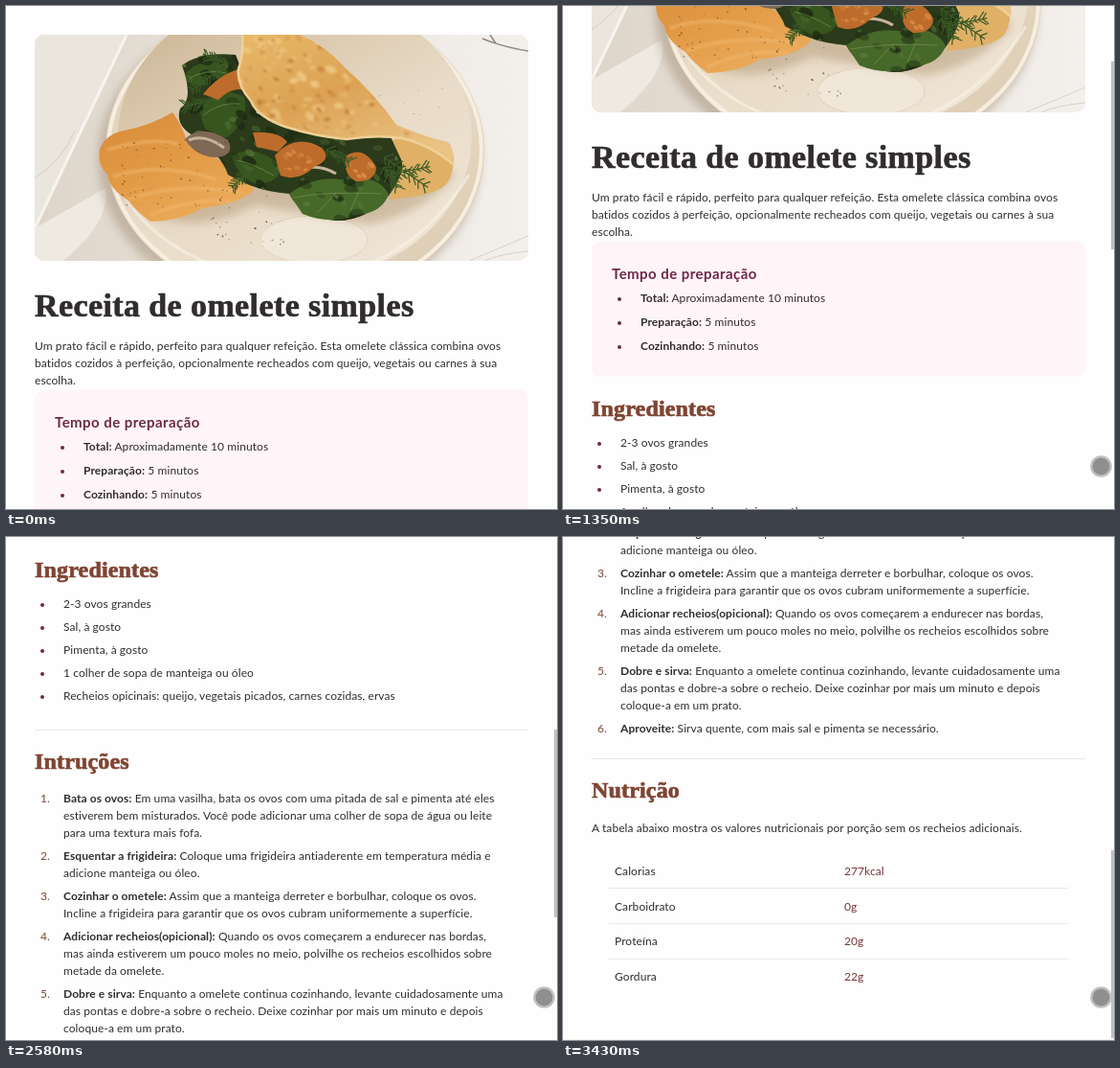
An HTML page that plays this animation: 576 by 525 pixels, repeating every 3.63 s.

```html
<!DOCTYPE html>
<html lang="pt-BR">
<head>
<meta charset="utf-8">
<title>Receita de omelete simples</title>
<style>
html, body { margin: 0; width: 100%; height: 100%; overflow: hidden; background: #fefefe; }
svg { display: block; }
text { font: 400 12px Lato, sans-serif; letter-spacing: .08px; fill: #312d2c; white-space: pre; }
.b { font-weight: 700; }
text.h1, text.h2 { font-family: "Liberation Serif", serif; font-weight: 700; stroke-width: .7px; }
text.h1 { font-size: 34px; letter-spacing: .4px; fill: #302d2c; stroke: #302d2c; }
text.h2 { font-size: 24px; letter-spacing: .17px; fill: #7f4533; stroke: #7f4533; }
text.h3 { font-size: 15px; font-weight: 700; letter-spacing: .45px; fill: #6c2944; }
text.num { fill: #7f4533; text-anchor: end; }
text.val { fill: #75333a; }
.dots circle { fill: #6c2944; }
.rules { stroke: #ebe9e8; }
</style>
</head>
<body>
<svg width="576" height="525" viewBox="0 0 576 525">
<defs>
  <clipPath id="frame"><rect x="30" y="30" width="516" height="236" rx="10"/></clipPath>
  <linearGradient id="marble"><stop offset="0" stop-color="#ddd5ca"/><stop offset=".3" stop-color="#e6dfd5"/><stop offset="1" stop-color="#f3f0ec"/></linearGradient>
  <linearGradient id="rim" x2="1" y2="1"><stop offset="0" stop-color="#dccbb2"/><stop offset=".5" stop-color="#ebdfcc"/><stop offset="1" stop-color="#d9c7ad"/></linearGradient>
  <linearGradient id="well" x2=".7" y2="1"><stop offset="0" stop-color="#c5ad8a"/><stop offset=".35" stop-color="#dbc9ae"/><stop offset=".65" stop-color="#e8dbc7"/><stop offset="1" stop-color="#efe5d6"/></linearGradient>
  <linearGradient id="puree" x2=".6" y2="1"><stop offset="0" stop-color="#d68a3a"/><stop offset=".55" stop-color="#e29a45"/><stop offset="1" stop-color="#ebab5a"/></linearGradient>
  <linearGradient id="egg" x2=".7" y2="1"><stop offset="0" stop-color="#e8b969"/><stop offset=".5" stop-color="#dca254"/><stop offset="1" stop-color="#e9c384"/></linearGradient>
  <filter id="soft" x="-20%" y="-20%" width="140%" height="140%"><feGaussianBlur stdDeviation="5"/></filter>
  <filter id="blur"><feGaussianBlur stdDeviation="1"/></filter>
  <clipPath id="eggClip"><use href="#fold"/></clipPath>
  <clipPath id="pureeClip"><use href="#spread"/></clipPath>
  <clipPath id="greenClip"><use href="#greens"/></clipPath>
</defs>
<g id="page">
  <g clip-path="url(#frame)">
    <rect x="30" y="30" width="516" height="236" fill="url(#marble)"/>
    <path d="M30 30H126L30 232Z" fill="#eae5dd"/>
    <path d="M126 30L30 232" stroke="#f7f4ee" stroke-width="3"/>
    <path d="M60 266Q110 225 104 190L30 232V266Z" fill="#eee9e1"/>
    <g fill="none" stroke="#c8bcae" opacity=".6">
      <path d="M500 266Q515 259 546 256M30 180Q60 160 72 130M484 266L546 240"/>
      <path d="M498 34Q520 43 546 47M506 30L512 39" stroke="#55483c" stroke-width="1.6"/>
    </g>
    <ellipse cx="296" cy="160" rx="200" ry="158" fill="#9c886f" opacity=".45" filter="url(#soft)"/>
    <ellipse cx="302" cy="150" rx="198" ry="160" fill="url(#rim)"/>
    <ellipse cx="302" cy="150" rx="195" ry="157" fill="none" stroke="#f6eee1" stroke-width="4"/>
    <ellipse cx="302" cy="136" rx="185" ry="151" fill="url(#well)"/>
    <path d="M118 190Q170 278 300 287Q420 280 484 176" fill="none" stroke="#faf3e7" stroke-width="3" opacity=".6"/>
    <ellipse cx="322" cy="244" rx="56" ry="25" fill="#f0e7d9" stroke="#e2d4bf"/>
    <path d="M120 195Q180 250 260 208L380 228Q440 215 470 175L420 140L200 130Z" fill="#a38661" opacity=".4" filter="url(#soft)"/>
    <path id="spread" d="M98 150Q103 133 128 129Q152 124 174 111Q183 122 190 143L236 168Q265 184 257 194Q242 207 205 211Q184 224 151 225Q136 214 128 203Q108 191 106 176Q95 165 98 150Z" fill="url(#puree)"/>
    <g clip-path="url(#pureeClip)" filter="url(#blur)" fill="none" stroke="#efb56c" stroke-width="4" opacity=".6">
      <path d="M106 150Q150 137 180 144M112 178Q160 162 220 181M128 202Q180 183 246 195M150 219Q190 200 235 204"/>
    </g>
    <path d="M390 144Q430 130 464 144Q472 165 462 184Q452 198 400 202Q412 180 390 144Z" fill="#e0b067"/>
    <path id="greens" d="M184 62Q203 47 240 51Q252 80 262 112L300 126L400 132L412 158Q420 170 400 198Q376 225 344 224Q308 220 296 196Q262 194 232 176Q225 155 199 137Q176 126 182 107Q197 98 184 62Z" fill="#2a3a1a"/>
    <g fill="#37551f">
      <path d="M188 70Q208 49 236 67Q228 84 196 82ZM203 110Q222 80 249 95Q255 120 231 137Q207 141 203 110ZM236 157Q258 143 286 165Q290 184 262 186Q243 179 236 157Z"/>
      <path d="M296 196Q325 175 356 182Q386 174 400 196Q394 216 366 218Q340 229 310 217Z" fill="#466829"/>
    </g>
    <g id="leaf" clip-path="url(#greenClip)"></g>
    <g fill="none" stroke="#7f9c56" opacity=".6">
      <path d="M206 114Q224 100 244 102M300 200Q340 193 392 196M325 216L345 195M360 214L368 195M241 161Q258 164 280 177M192 75Q212 65 230 70"/>
    </g>
    <path d="M187 139Q204 122 232 140Q240 156 220 158Q199 158 187 139Z" fill="#7f6855"/>
    <path d="M191 140Q208 133 228 148M295 178Q320 160 345 175" fill="none" stroke="#c9b49a" stroke-width="3"/>
    <path d="M206 92Q222 72 243 66L250 88Q236 84 222 98ZM258 132Q285 130 294 142L284 152L262 147ZM281 156Q302 132 330 148Q342 160 322 168Q306 184 287 177ZM356 156Q374 145 387 168Q386 184 366 183Q351 176 356 156Z" fill="#bd6c2b"/>
    <g id="bits" fill="#e0944a"></g>
    <path id="fold" d="M247 28H302Q332 39 354 64Q386 92 408 124Q436 136 462 142Q470 153 468 166Q446 146 414 138Q388 134 356 139Q323 136 292 126Q263 116 256 99Q241 82 243 66Q249 49 247 28Z" fill="url(#egg)"/>
    <g id="spots" clip-path="url(#eggClip)" filter="url(#blur)"></g>
    <path d="M247 30Q249 49 243 66Q241 82 256 99Q263 116 292 126Q323 136 356 139Q388 134 414 138Q446 146 468 166" fill="none" stroke="#f0d095" stroke-width="2.5"/>
    <g id="dill" fill="none" stroke="#3a5a25" stroke-width="1.2"></g>
    <g id="pepper"></g>
  </g>

  <text class="h1" x="30" y="324">Receita de omelete simples</text>
  <text x="30" y="359">Um prato fácil e rápido, perfeito para qualquer refeição. Esta omelete clássica combina ovos</text>
  <text x="30" y="377">batidos cozidos à perfeição, opcionalmente recheados com queijo, vegetais ou carnes à sua</text>
  <text x="30" y="395">escolha.</text>

  <rect x="30" y="400.5" width="516" height="141.5" rx="9" fill="#fff5f9"/>
  <text class="h3" x="51" y="440">Tempo de preparação</text>
  <text x="81" y="464"><tspan class="b">Total:</tspan> Aproximadamente 10 minutos</text>
  <text x="81" y="489"><tspan class="b">Preparação:</tspan> 5 minutos</text>
  <text x="81" y="514"><tspan class="b">Cozinhando:</tspan> 5 minutos</text>

  <text class="h2" x="30" y="583">Ingredientes</text>
  <text x="60" y="615">2-3 ovos grandes</text>
  <text x="60" y="639">Sal, à gosto</text>
  <text x="60" y="663">Pimenta, à gosto</text>
  <text x="60" y="687">1 colher de sopa de manteiga ou óleo</text>
  <text x="60" y="711">Recheios opicinais: queijo, vegetais picados, carnes cozidas, ervas</text>
  <g class="dots">
    <circle cx="59" cy="461" r="2"/><circle cx="59" cy="486" r="2"/><circle cx="59" cy="511" r="2"/>
    <circle cx="38" cy="612" r="2"/><circle cx="38" cy="636" r="2"/><circle cx="38" cy="660" r="2"/><circle cx="38" cy="684" r="2"/><circle cx="38" cy="708" r="2"/>
  </g>

  <text class="h2" x="30" y="783">Intruções</text>
  <text class="num" x="46" y="818">1.</text>
  <text x="60" y="818"><tspan class="b">Bata os ovos:</tspan> Em uma vasilha, bata os ovos com uma pitada de sal e pimenta até eles</text>
  <text x="60" y="836">estiverem bem misturados. Você pode adicionar uma colher de sopa de água ou leite</text>
  <text x="60" y="854">para uma textura mais fofa.</text>
  <text class="num" x="46" y="878">2.</text>
  <text x="60" y="878"><tspan class="b">Esquentar a frigideira:</tspan> Coloque uma frigideira antiaderente em temperatura média e</text>
  <text x="60" y="896">adicione manteiga ou óleo.</text>
  <text class="num" x="46" y="920">3.</text>
  <text x="60" y="920"><tspan class="b">Cozinhar o ometele:</tspan> Assim que a manteiga derreter e borbulhar, coloque os ovos.</text>
  <text x="60" y="938">Incline a frigideira para garantir que os ovos cubram uniformemente a superfície.</text>
  <text class="num" x="46" y="962">4.</text>
  <text x="60" y="962"><tspan class="b">Adicionar recheios(opicional):</tspan> Quando os ovos começarem a endurecer nas bordas,</text>
  <text x="60" y="980">mas ainda estiverem um pouco moles no meio, polvilhe os recheios escolhidos sobre</text>
  <text x="60" y="998">metade da omelete.</text>
  <text class="num" x="46" y="1022">5.</text>
  <text x="60" y="1022"><tspan class="b">Dobre e sirva:</tspan> Enquanto a omelete continua cozinhando, levante cuidadosamente uma</text>
  <text x="60" y="1040">das pontas e dobre-a sobre o recheio. Deixe cozinhar por mais um minuto e depois</text>
  <text x="60" y="1058">coloque-a em um prato.</text>
  <text class="num" x="46" y="1082">6.</text>
  <text x="60" y="1082"><tspan class="b">Aproveite:</tspan> Sirva quente, com mais sal e pimenta se necessário.</text>

  <text class="h2" x="30" y="1150">Nutrição</text>
  <text x="30" y="1186">A tabela abaixo mostra os valores nutricionais por porção sem os recheios adicionais.</text>
  <text x="54" y="1231">Calorias</text><text class="val" x="294" y="1231">277kcal</text>
  <text x="54" y="1268">Carboidrato</text><text class="val" x="294" y="1268">0g</text>
  <text x="54" y="1304">Proteína</text><text class="val" x="294" y="1304">20g</text>
  <text x="54" y="1341">Gordura</text><text class="val" x="294" y="1341">22g</text>
  <path class="rules" d="M30 742.5H546M30 1109.5H546M48 1244.5H528M48 1281.5H528M48 1318.5H528"/>
  <path d="M0 1402.5H576" stroke="#f5f4f3"/>
</g>
<rect id="thumb" x="573" width="3" height="196" fill="#c1c0c0"/>
<g id="pointer"><circle r="11.3" fill="#c0c0c0"/><circle r="9" fill="#8f8f8f"/></g>
</svg>
<script>
const LOOP = 3630;
const $ = id => document.getElementById(id);

let seed = 11;
const rand = (a, b) => {
  seed = (seed * 16807) % 2147483647;
  return a + (b - a) * seed / 2147483647;
};

// Seasoning, browning and herbs of the dish
function scatter(id, n, [x0, x1, y0, y1], size, fill) {
  let out = '';
  for (let i = 0; i < n; i++) {
    const r = rand(...size), x = rand(x0, x1), y = rand(y0, y1);
    out += `<ellipse rx="${r}" ry="${r * .6}" opacity="${rand(.25, .8)}" fill="${fill}"
      transform="translate(${x} ${y}) rotate(${rand(-20, 70)})"/>`;
  }
  $(id).innerHTML += out;
}
function sprig(x, y, angle, length) {
  let d = '';
  for (let i = 0; i < 9; i++) {
    const at = length * i / 9, bx = x + at * Math.cos(angle), by = y + at * Math.sin(angle);
    for (const side of [-.8, .8]) {
      const a = angle + side + rand(-.2, .2), l = rand(5, 11);
      d += `M${bx} ${by}l${l * Math.cos(a)} ${l * Math.sin(a)}`;
    }
  }
  $('dill').innerHTML += `<path d="M${x} ${y}l${length * Math.cos(angle)} ${length * Math.sin(angle)}${d}"/>`;
}
scatter('leaf', 90, [182, 410, 50, 225], [3, 9], '#1d2912');
scatter('leaf', 60, [182, 410, 50, 225], [2, 6], '#5b7c39');
scatter('bits', 14, [284, 328, 146, 172], [1, 4]);
scatter('bits', 7, [358, 382, 156, 178], [1, 4]);
scatter('spots', 70, [245, 440, 30, 142], [2, 7], '#f1cd8a');
scatter('spots', 130, [245, 440, 30, 142], [.8, 4], '#bb742a');
scatter('pepper', 75, [118, 245, 140, 210], [.4, 1.3], '#5e3a1a');
scatter('pepper', 25, [215, 300, 195, 250], [.4, 1.4], '#4a3521');
scatter('pepper', 8, [385, 470, 75, 130], [.4, 1], '#4a3521');
sprig(225, 65, 2.5, 40);
sprig(215, 98, 2.9, 30);
sprig(232, 60, 3.5, 28);
sprig(395, 158, .6, 56);
sprig(402, 176, -.2, 42);
sprig(395, 168, 1, 26);
sprig(335, 150, .5, 28);
sprig(255, 172, 2.4, 26);

// Bursts of movement: first change, last change, number of changes
const bursts = [[70, 330, 4], [790, 1280, 8], [1350, 1830, 7], [1900, 2110, 4], [2370, 2860, 8], [3080, 3430, 6]];
function snap(t) {
  const burst = bursts.filter(b => t >= b[0]).pop();
  if (!burst) return 0;
  const [from, to, n] = burst, step = (to - from) / (n - 1);
  return Math.min(to, from + Math.floor((t - from) / step + 1e-6) * step);
}

// Scroll position through time, joined by monotone cubics
const stops = [[0, 0], [720, 0], [790, 4], [1000, 44], [1350, 155], [2110, 359], [2300, 359],
  [2370, 375], [2580, 541], [2860, 655], [3010, 655], [3080, 664], [3150, 695], [3430, 878], [LOOP, 878]];
const secant = i => (stops[i + 1][1] - stops[i][1]) / (stops[i + 1][0] - stops[i][0]);
const tangents = stops.map((_, i) => {
  if (i === 0 || i === stops.length - 1) return 0;
  const a = secant(i - 1), b = secant(i);
  return a * b ? 2 * a * b / (a + b) : 0;
});
function scrollAt(t) {
  let i = 0;
  while (i < stops.length - 2 && t >= stops[i + 1][0]) i++;
  const [t0, y0] = stops[i], [t1, y1] = stops[i + 1];
  const h = t1 - t0, u = (t - t0) / h, v = 1 - u;
  return y0 * v * v * (1 + 2 * u) + y1 * u * u * (3 - 2 * u)
    + h * u * v * (tangents[i] * v - tangents[i + 1] * u);
}

const place = (id, x, y) => $(id).setAttribute('transform', `translate(${x} ${y})`);
const show = (id, on) => $(id).setAttribute('visibility', on ? 'visible' : 'hidden');

function draw(now) {
  const t = snap(now % LOOP), y = Math.round(scrollAt(t));
  place('page', 0, -y);
  place('thumb', 0, Math.round(y * .3724));
  show('thumb', t >= 790);
  const left = (1 - Math.min(1, Math.max(0, (t - 70) / 260))) ** 2;
  place('pointer', 562.5 - 3 * left, 480.5 + 10 * left);
  show('pointer', t >= 70);
}
const start = performance.now();
function tick() {
  draw(performance.now() - start);
  requestAnimationFrame(tick);
}
tick();
</script>
</body>
</html>
```
